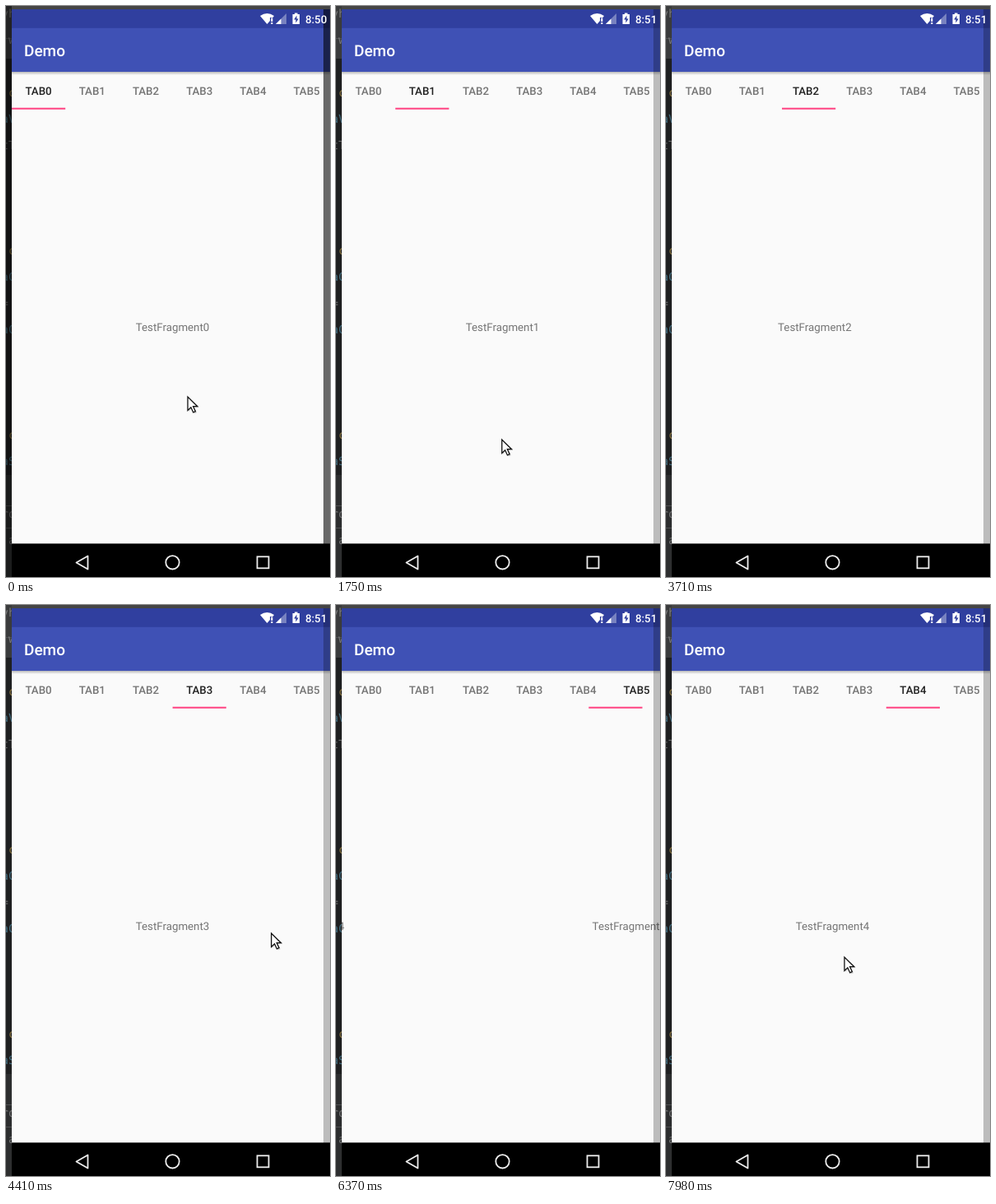
Animation, 394 px wide and 694 px high, one loop 8000 ms. Source, as an HTML page:

```html
<!DOCTYPE html>
<html lang="en">
<head>
<meta charset="utf-8">
<title>Tab pager demo</title>
<style>
  html, body { margin: 0; width: 100%; height: 100%; overflow: hidden; background: #1f2021; }
  svg { display: block; width: 394px; height: 694px; }
  text { font: 13.3px Roboto, sans-serif; text-rendering: geometricPrecision; white-space: pre; }
  .medium { font-weight: 500; }
  .title { font-size: 19px; font-weight: 500; }
  .code { font: 14px "DejaVu Sans Mono", monospace; }
  .mid { text-anchor: middle; }
</style>
</head>
<body>
<svg viewBox="0 0 394 694">
  <defs>
    <clipPath id="screen"><rect x="7" y="4" width="387" height="690"/></clipPath>
    <linearGradient id="shade" x2="0" y2="1">
      <stop stop-color="#000" stop-opacity=".26"/>
      <stop offset="1" stop-color="#000" stop-opacity="0"/>
    </linearGradient>
  </defs>

  <rect width="394" height="694" fill="#1f2021"/>
  <rect width="394" height="4" fill="#454545"/>
  <rect width="7" height="64" fill="#3a3b3c"/>
  <rect y="570" width="7" height="124" fill="#2d2e2f"/>
  <path d="M0 39.5H7M0 607.5H7M0 634.5H7" stroke="#505152"/>
  <g id="code" opacity=".65"></g>
  <rect id="leftShade" width="7" height="694"/>

  <g clip-path="url(#screen)">
    <rect x="7" y="80" width="387" height="574" fill="#fafafa"/>
    <g id="pages"></g>
    <g id="tabs"></g>
    <rect id="indicator" y="123.700" width="65.200" height="2" fill="#ff4081"/>

    <rect x="7" y="4" width="387" height="23" fill="#303f9f"/>
    <rect x="7" y="26.800" width="387" height="53.200" fill="#3f51b5"/>
    <rect x="7" y="80" width="387" height="4" fill="url(#shade)"/>
    <text class="title" x="22" y="61" fill="#fff">Demo</text>

    <rect id="rightShade" x="386" y="4" width="8" height="650"/>

    <g fill="#fff">
      <path d="M309 12Q317.500 6 326 12L324.500 14H321V18L317.500 22Z"/>
      <path d="M322.300 14.500h2v4.500h-2zM322.300 20h2v2h-2z"/>
      <path d="M341 9V22H328Z" opacity=".35"/>
      <path d="M334.500 15.500V22H328Z"/>
      <path d="M348.500 10h2.500v-1.500h3.500v1.500h2.500v12h-8.500z"/>
      <path d="M353.500 11.500l-3.300 5h2.200v4l3.300-5h-2.200z" fill="#303f9f"/>
      <text id="clock" class="medium" x="364" y="21"></text>
    </g>

    <rect x="7" y="653.400" width="387" height="41" fill="#000"/>
    <g fill="none" stroke="#ededed" stroke-width="1.800">
      <path d="M85.500 676.500L99.500 668.500V684.500Z" stroke-linejoin="round"/>
      <circle cx="202.500" cy="676.300" r="8.200"/>
      <rect x="305.500" y="669.300" width="14" height="14"/>
    </g>
  </g>

  <g id="cursor">
    <path d="M2 2v17l4-4 3 6.500 3-1.300-3-6.200h5.500z" fill="#000" opacity=".18"/>
    <path d="M1 1v16.400l3.900-3.600 2.800 6.100 2.700-1.200-2.800-6h5.200z" fill="#fff" stroke="#111" stroke-width="1.300"/>
  </g>
</svg>

<script>
const LOOP = 8000, STEP = 70, SWIPE = 7 * STEP;
const LEFT = 7, PAGE = 391, TAB = 65.2, STATUS_CHANGE = 1190;

// The pointer appears, glides to where a swipe begins, and hides while pressed.
const gestures = [
  { show: 0, end: 630, from: [220, 474], to: [300, 420], swipe: 770, turn: 1 },
  { show: 1470, end: 2380, from: [169, 556], to: [296, 436], swipe: 2730, turn: 1 },
  { show: 3290, end: 3640, from: [70, 470], to: [300, 402], swipe: 3710, turn: 1 },
  { show: 4270, end: 4550, from: [315, 401], to: [335, 392], swipe: 4760, turn: 1 },
  { show: 5320, end: 6020, from: [165, 442], to: [284, 436], swipe: 6160, turn: 1 },
  { show: 6860, end: 7350, from: [137, 547], to: [83, 454], swipe: 7490, turn: -1 },
  { show: 7980, end: LOOP, from: [216, 427], to: [216, 427], swipe: LOOP, turn: 0 }
];

const $ = id => document.getElementById(id);
const clamp = x => Math.min(1, Math.max(0, x));
const smooth = x => x * x * (3 - 2 * x);

function addText(parent, content, attrs) {
  const el = document.createElementNS("http://www.w3.org/2000/svg", "text");
  for (const [name, value] of Object.entries(attrs)) el.setAttribute(name, value);
  el.textContent = content;
  return parent.appendChild(el);
}

// Sliver of an editor behind the phone, one text row every 32 px.
"vh| w|  | c|aV|tT|  |  |  | c|aC|= |aC|  |  |  | c|aS|  |ro| a".split("|").forEach((line, row) => {
  const fill = line === " c" ? "#c0a050" : line[0] === "a" ? "#5595b0" : "#999";
  addText($("code"), line, { class: "code", x: -5.4, y: 14 + 32 * row, fill });
});

const tabs = [], pages = [];
for (let i = 0; i < 6; i++) {
  tabs.push(addText($("tabs"), "TAB" + i, { class: "medium mid", x: LEFT + TAB * (i + .5), y: 108 }));
  pages.push(addText($("pages"), "TestFragment" + i, { class: "mid", y: 395, fill: "#757575" }));
}

function pagerAt(t) {
  return gestures.reduce((sum, { swipe, turn }) =>
    t < swipe ? sum : sum + turn * smooth(clamp((t - swipe + STEP) / SWIPE)), 0);
}

function pointerAt(t) {
  const { show, end, from, to } = gestures.find(g => t < g.swipe);
  if (t < show) return null;
  const start = show + STEP, k = clamp((t - start) / (end - start));
  return from.map((value, axis) => value + (to[axis] - value) * k);
}

function render(time) {
  const t = Math.floor(time / STEP) * STEP;
  const position = pagerAt(t), selected = Math.round(position);
  tabs.forEach((tab, i) => tab.setAttribute("fill", i === selected ? "#212121" : "#757575"));
  pages.forEach((page, i) => page.setAttribute("x", LEFT + PAGE * (i - position + .5)));
  $("indicator").setAttribute("x", LEFT + TAB * position);

  const early = t < STATUS_CHANGE;
  $("clock").textContent = early ? "8:50" : "8:51";
  $("leftShade").setAttribute("opacity", early ? .4 : 0);
  $("rightShade").setAttribute("opacity", early ? .58 : .25);

  const pointer = pointerAt(t);
  $("cursor").setAttribute("visibility", pointer ? "visible" : "hidden");
  if (pointer) $("cursor").setAttribute("transform", `translate(${pointer})`);
}

function tick() {
  render(performance.now() % LOOP);
  requestAnimationFrame(tick);
}
tick();
</script>
</body>
</html>
```
